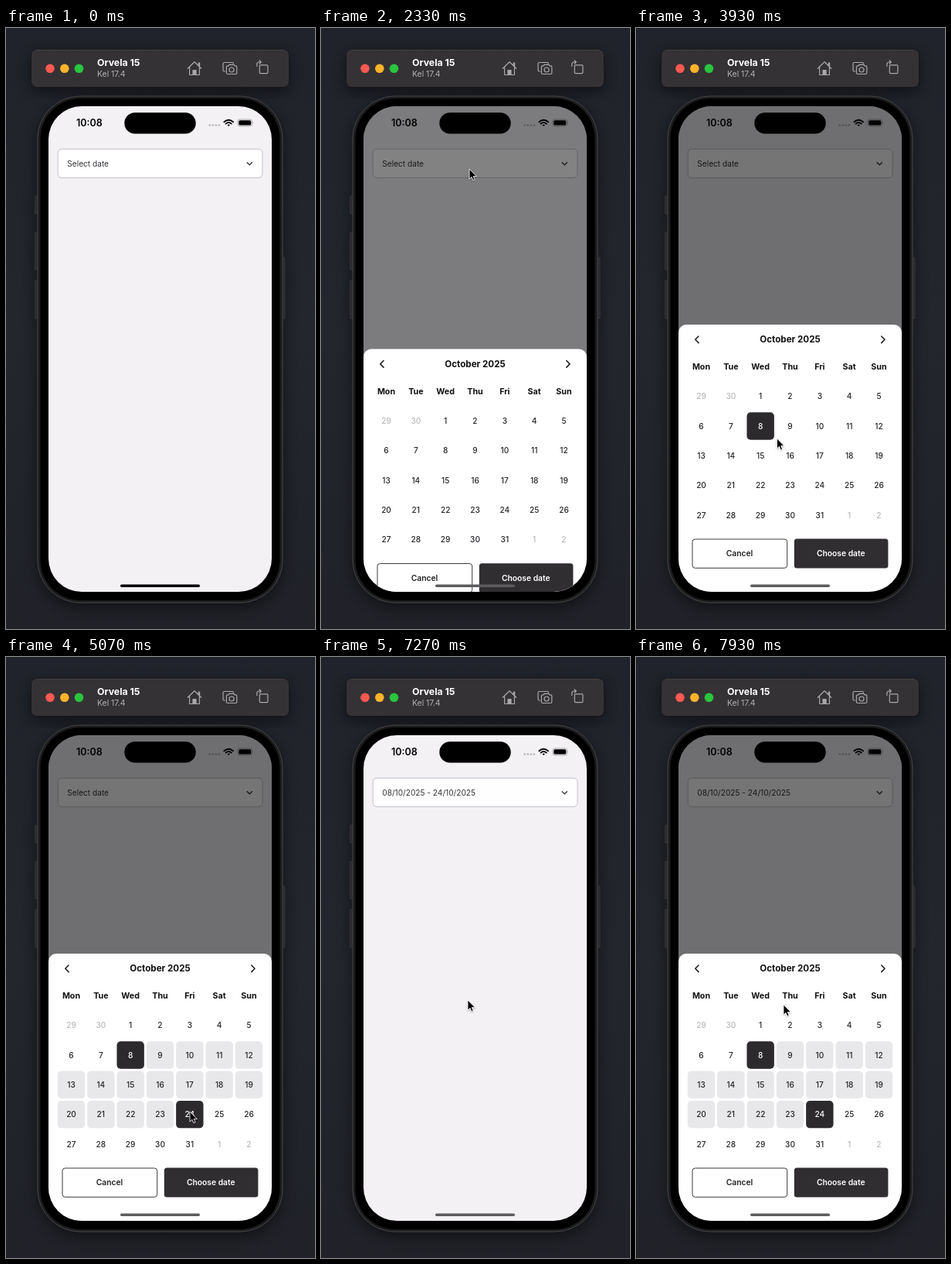
An HTML page that plays this animation: 400 px wide and 776 px high, repeating every 8 s.

```html
<!DOCTYPE html>
<html lang="en">
<head>
<meta charset="utf-8">
<title>Date range picker</title>
<style>
  html, body { margin: 0; width: 100%; height: 100%; overflow: hidden; background: #21242b; }
  svg { display: block; width: 100vw; height: 100vh; }
  text { font-family: Inter, Roboto, sans-serif; }
  .mid { text-anchor: middle; }
  .bold { font-weight: 700; }
  .semi { font-weight: 600; }
  .line { fill: none; stroke-linecap: round; stroke-linejoin: round; }
</style>
</head>
<body>
<svg viewBox="0 0 400 776">
  <defs>
    <linearGradient id="desk" x2="0" y2="1">
      <stop offset="0" stop-color="#20232b"/>
      <stop offset=".5" stop-color="#23262d"/>
      <stop offset="1" stop-color="#202228"/>
    </linearGradient>
    <filter id="shade" x="-20%" y="-20%" width="140%" height="150%">
      <feDropShadow dx="0" dy="6" stdDeviation="10" flood-color="#000" flood-opacity=".5"/>
    </filter>
    <filter id="soft" x="-60%" y="-60%" width="220%" height="220%">
      <feDropShadow dx="0" dy="1" stdDeviation="1" flood-color="#000" flood-opacity=".35"/>
    </filter>
    <clipPath id="glass"><rect x="55" y="101" width="289" height="627" rx="43"/></clipPath>
  </defs>

  <rect width="400" height="776" fill="url(#desk)"/>

  <!-- window toolbar -->
  <rect x="32.5" y="27.5" width="334" height="49" rx="7" fill="#343134" stroke="#161619" filter="url(#shade)"/>
  <path d="M39 28.3H360" stroke="#4b494c" stroke-width=".8"/>
  <circle cx="57" cy="52.3" r="5.8" fill="#fe5952"/>
  <circle cx="75.8" cy="52.3" r="5.8" fill="#fdb32b"/>
  <circle cx="94.5" cy="52.3" r="5.8" fill="#29c53f"/>
  <text x="118" y="49.3" font-size="12.3" class="bold" fill="#fff">Orvela 15</text>
  <text x="118" y="62.5" font-size="10.4" fill="#b3b1b4">Kel 17.4</text>
  <g class="line" stroke="#a9a7aa" stroke-width="1.2">
    <path d="M235.3 52.3L244 43.8L252.7 52.3M237.6 50.5V60.5H250.4V50.5M249.3 48V45H250.6V49.5"/>
    <path d="M242 60V54.5H246V60Z" fill="#a9a7aa"/>
    <path d="M283.5 56H282.5Q281 56 281 54.5V46Q281 44.5 282.5 44.5H293Q294.5 44.5 294.5 46"/>
    <path d="M287 48.8H288.2L289 47.3H295L295.8 48.8H297.3Q298.8 48.8 298.8 50.3V58Q298.8 59.5 297.3 59.5H287Q285.4 59.5 285.4 58V50.3Q285.4 48.8 287 48.8Z"/>
    <circle cx="292" cy="54" r="3"/>
    <rect x="328.3" y="47.8" width="10.6" height="10.8" rx="1.2"/>
    <path d="M324.8 49.5V47Q324.8 44 327.8 44H330M328.2 42L330.3 44L328.2 46"/>
  </g>

  <!-- phone body -->
  <g filter="url(#shade)">
    <g fill="#2b2c2f" stroke="#3b3c3f" stroke-width=".6">
      <rect x="37.3" y="217" width="6" height="23" rx="1"/>
      <rect x="37.3" y="264" width="6" height="48" rx="1"/>
      <rect x="37.3" y="326" width="6" height="49" rx="1"/>
      <rect x="355" y="296" width="6" height="79" rx="1"/>
    </g>
    <rect x="41" y="88" width="317" height="654" rx="55" fill="#1d1d1f" stroke="#454548"/>
  </g>
  <rect x="44.5" y="91" width="310" height="648" rx="52" fill="#000"/>

  <g clip-path="url(#glass)">
    <rect x="55" y="101" width="289" height="628" fill="#f3f1f4"/>
    <g fill="#b4b3b6">
      <circle cx="263.8" cy="125.5" r="1.3"/><circle cx="267.8" cy="125.5" r="1.3"/>
      <circle cx="271.8" cy="125.5" r="1.3"/><circle cx="275.8" cy="125.5" r="1.3"/>
    </g>
    <g id="field">
      <rect x="67.2" y="156.3" width="264.8" height="37" rx="5" fill="#fff" stroke="#c1bfc8"/>
      <text id="value" x="79.3" y="178.8" font-size="10.15" fill="#343236"></text>
      <path class="line" d="M312.2 173.8L315.3 176.9L318.4 173.8" stroke="#29272b" stroke-width="1.3"/>
    </g>
    <rect id="dim" x="55" y="101" width="289" height="628" fill="#000"/>

    <text x="107.8" y="127" font-size="12.5" class="mid semi">10:08</text>
    <rect x="153.3" y="109.3" width="92.4" height="27.2" rx="13.6"/>
    <g class="line" stroke="#000" stroke-width="1.9" stroke-linecap="butt">
      <path d="M282.4 121.3Q288.2 116.2 294 121.3M284.6 123.6Q288.2 120.5 291.8 123.6"/>
      <path d="M286.4 125.1Q288.2 123.7 290 125.1L288.2 126.9Z" fill="#000" stroke="none"/>
    </g>
    <rect x="300" y="118" width="18.5" height="8.8" rx="2.7" fill="none" stroke="#000" stroke-opacity=".38" stroke-width=".8"/>
    <rect x="301.3" y="119.2" width="15.9" height="6.4" rx="1.7"/>
    <path d="M319.6 121V124Q321 122.5 319.6 121" fill-opacity=".4"/>

    <g id="sheet">
      <rect x="55" y="383" width="289" height="380" rx="10" fill="#fff"/>
      <path class="line" d="M81 398L76.8 402.3L81 406.6M317.8 398L322 402.3L317.8 406.6" stroke="#222024" stroke-width="1.6"/>
      <text x="199.5" y="406.4" font-size="11.6" class="mid bold" fill="#111">October 2025</text>
      <g id="days"></g>
      <rect x="73" y="660" width="122.7" height="37.3" rx="3.5" fill="#fff" stroke="#3a383c"/>
      <text x="134" y="682.4" font-size="10.3" class="mid semi" fill="#222024">Cancel</text>
      <g id="choose">
        <rect x="204.8" y="659.6" width="121.6" height="38" rx="3.5" fill="#302e31"/>
        <text x="265.3" y="682.4" font-size="10.3" class="mid semi" fill="#fff">Choose date</text>
      </g>
    </g>
    <rect id="bar" x="148" y="718.4" width="103" height="3.6" rx="1.8"/>
  </g>

  <path id="cursor" d="M0 0V13L3 10.3L4.9 14.7L7 13.8L5.2 9.5H9.3Z" fill="#000" stroke="#fff" stroke-width=".8" filter="url(#soft)"/>
</svg>

<script>
const LOOP = 8000, FPS = 15, DROP = 345;
const PICK_START = 3530, PICK_END = 4600, CONFIRM = 5610;
const $ = id => document.getElementById(id);

// Each row: time, then values
const cursorPath = [
  [860, -6, 308], [1100, 62, 272], [1330, 150, 212], [1530, 192, 182], [2400, 192, 182],
  [2600, 186, 331], [2867, 169, 475], [3200, 163, 510], [3700, 163, 510],
  [4400, 238, 587], [5100, 238, 587], [5450, 249, 673], [6050, 249, 673],
  [6650, 194, 180], [7050, 192, 180], [7260, 190, 443], [7700, 191, 449]
];
const sheetOpen = [[2130, 0], [2500, 1], [5635, 1], [5995, 0], [7290, 0], [7650, 1]];
const fieldAlpha = [[1630, 1], [1780, .17], [1900, .17], [2150, 1],
                    [6790, 1], [6920, .17], [7020, .17], [7290, 1]];
const chooseAlpha = [[5450, 1], [5530, .3], [5590, .3], [5770, 1]];

const smooth = k => k * k * (3 - 2 * k);
const easeOut = k => 1 - (1 - k) ** 3;

function sample(rows, t, ease) {
  const i = rows.findIndex(row => row[0] > t);
  if (i < 0) return rows[rows.length - 1].slice(1);
  if (i === 0) return rows[0].slice(1);
  const a = rows[i - 1], b = rows[i];
  const k = ease((t - a[0]) / (b[0] - a[0]));
  return a.slice(1).map((v, n) => v + (b[n + 1] - v) * k);
}

function add(parent, tag, attrs, content = '') {
  const node = document.createElementNS('http://www.w3.org/2000/svg', tag);
  for (const name in attrs) node.setAttribute(name, attrs[name]);
  node.textContent = content;
  return parent.appendChild(node);
}

const columnX = i => 84.5 + 38.33 * i;
['Mon', 'Tue', 'Wed', 'Thu', 'Fri', 'Sat', 'Sun'].forEach((name, i) =>
  add($('days'), 'text', { x: columnX(i), y: 441.2, 'font-size': 10.7, class: 'mid bold', fill: '#111' }, name));

const cells = Array.from({ length: 35 }, (_, i) => {
  const day = i - 1, x = columnX(i % 7), y = 475.6 + 38.35 * Math.floor(i / 7);
  const label = day < 1 ? day + 30 : day > 31 ? day - 31 : day;
  const box = add($('days'), 'rect', { x: x - 17.7, y: y - 17.7, width: 35.4, height: 35.4, rx: 5 });
  const text = add($('days'), 'text',
    { x, y: y + 3.7, 'font-size': 10.1, 'font-weight': 500, class: 'mid' }, label);
  return { day, box, text };
});

function paintDays(t) {
  const first = t >= PICK_START ? 8 : NaN, last = t >= PICK_END ? 24 : NaN;
  for (const { day, box, text } of cells) {
    const chosen = day === first || day === last;
    const between = day > first && day < last;
    const outside = day < 1 || day > 31;
    box.setAttribute('fill', chosen ? '#2c2a2d' : between ? '#e8e7e9' : 'none');
    text.setAttribute('fill', chosen ? '#fff' : outside ? '#b9b8bb' : '#252327');
  }
}

function render(t) {
  const rising = t < 5000 || t > 7000;
  const [open] = sample(sheetOpen, t, rising ? easeOut : smooth);
  const [x, y] = sample(cursorPath, t, smooth);
  $('sheet').setAttribute('transform', `translate(0 ${DROP * (1 - open)})`);
  $('dim').setAttribute('opacity', .54 * open);
  $('field').setAttribute('opacity', sample(fieldAlpha, t, smooth)[0]);
  $('choose').setAttribute('opacity', sample(chooseAlpha, t, smooth)[0]);
  $('value').textContent = t < CONFIRM ? 'Select date' : '08/10/2025 - 24/10/2025';
  $('bar').setAttribute('fill', t < 2250 ? '#000' : '#5c5b5e');
  $('cursor').setAttribute('transform', `translate(${x} ${y})`);
  $('cursor').setAttribute('visibility', t < 865 ? 'hidden' : 'visible');
  paintDays(t);
}

const start = performance.now();
function tick(now) {
  const t = Math.max(0, now - start) % LOOP;
  render(Math.floor((t + 4) * FPS / 1000) * 1000 / FPS % LOOP);
  requestAnimationFrame(tick);
}
render(0);
requestAnimationFrame(tick);
</script>
</body>
</html>
```
